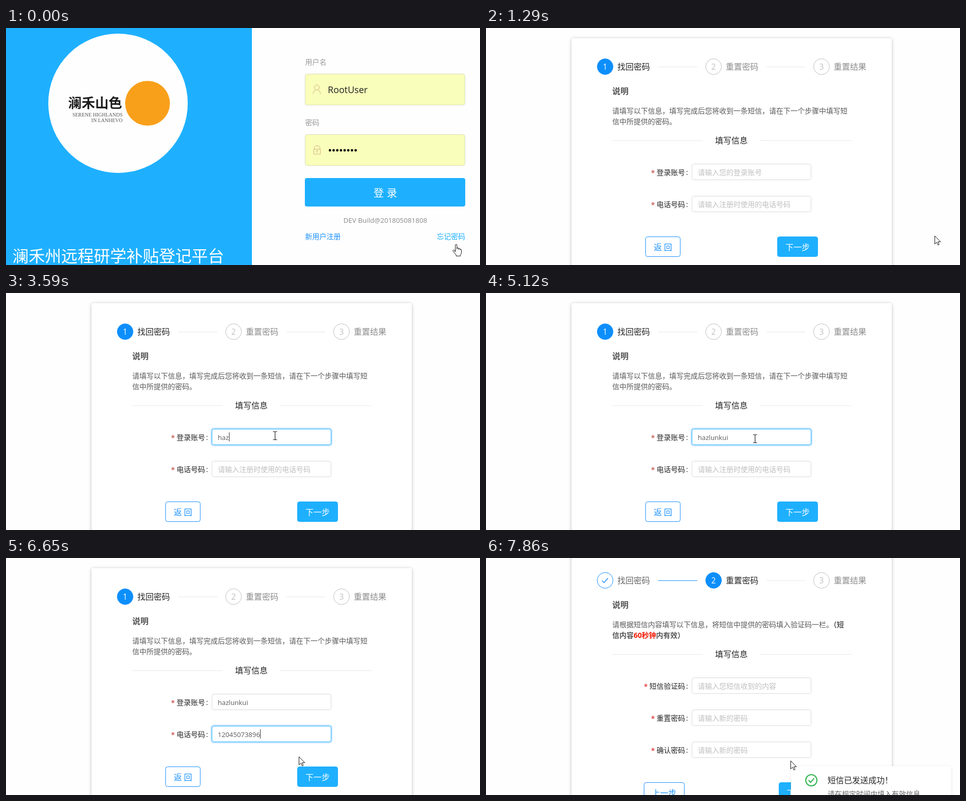
Animation of 931 by 466 pixels, one loop 7.99 s. Source, as an HTML page:

```html
<!DOCTYPE html>
<html lang="zh-CN">
<head>
<meta charset="utf-8">
<title>找回密码</title>
<style>
  html, body { margin: 0; width: 100%; height: 100%; overflow: hidden; background: #fefefe; }
  svg { display: block; width: 100vw; height: 100vh; }
  text { font-family: 'Open Sans', 'Noto Sans CJK SC', 'Noto Sans CJK', sans-serif; }
  .serif { font-family: 'Liberation Serif', 'Noto Serif', serif; }
</style>
</head>
<body>
<svg id="stage" viewBox="0 0 931 466"></svg>
<script>
const LOOP = 7990;
const SKY = '#1eb0ff', BLUE = '#1890ff', GREY = '#d9d9d9';
const LOGIN = 'hazlunkui', PHONE = '12045073896';

// ---- drawing helpers (text is placed by its vertical centre) ----
const text = (x, cy, str, size, fill, more = '') =>
  `<text x="${x}" y="${cy + size * 0.38}" font-size="${size}" fill="${fill}" ${more}>${str}</text>`;
const rect = (x, y, w, h, fill, more = '') =>
  `<rect x="${x}" y="${y}" width="${w}" height="${h}" fill="${fill}" ${more}/>`;
const line = (x1, x2, y, color, more = '') =>
  `<path d="M${x1} ${y}H${x2}" stroke="${color}" ${more}/>`;
const mid = 'text-anchor="middle"';

const field = (id, cy, label, hint, star) => {
  const left = 391 - label.length * 14;
  return text(left - 11, cy + 1, '*', 14, star) +
    text(left, cy, label + '<tspan dx="2">:</tspan>', 14, '#262626') +
    rect(403, cy - 18, 237, 34, 'none', `id="${id}Glow" display="none" rx="5" stroke="${BLUE}" stroke-opacity=".22" stroke-width="3"`) +
    rect(404.5, cy - 16.5, 234, 31, '#fff', `id="${id}Box" rx="4" stroke="${GREY}"`) +
    text(416, cy, hint, 14, '#bfbfbf', `id="${id}Hint"`) +
    text(416, cy, '', 13.2, '#595959', `id="${id}Text"`) +
    `<path id="${id}Caret" stroke="#333"/>`;
};

const heading = () =>
  text(248, 124, '说明', 16, '#555', 'font-weight="700"') +
  line(248, 426, 221.5, '#e8e8e8') + line(537, 718, 221.5, '#e8e8e8') +
  text(450, 221, '填写信息', 16, '#262626');

const stepMark = (n, cx, title) =>
  `<circle id="ring${n}" cx="${cx}" cy="76" r="15.5"/>` +
  text(cx, 76, n, 15.5, '#bfbfbf', `id="num${n}" ${mid}`) +
  text(cx + 24, 76, title, 16, '#8c8c8c', `id="title${n}"`);

const button = (id, x, y, w, label, solid) =>
  rect(x + .5, y + .5, w - 1, 39, solid ? SKY : '#fff', `id="${id}" rx="4" stroke="${solid ? SKY : BLUE}"`) +
  text(x + w / 2, y + 20.5, label, 16, solid ? '#fff' : BLUE, mid);

// ---- scenes ----
function loginPage() {
  const box = y => rect(587.5, y + .5, 314, 61, '#f9ffba', 'rx="4" stroke="#d9dbc0"');
  let dots = '';
  for (let i = 0; i < 8; i++) dots += `<circle cx="${636.3 + i * 7.2}" cy="240.5" r="2.4"/>`;
  return rect(0, 0, 483, 466, SKY) +
    '<circle cx="220" cy="148" r="137" fill="#fefefe"/>' +
    '<circle cx="278" cy="148" r="44" fill="#f9a01b"/>' +
    text(122, 147, '澜禾山色', 26.5, '#1c1c1c', 'font-weight="700"') +
    text(229, 170, 'SERENE HIGHLANDS', 10, '#555', 'class="serif" text-anchor="end"') +
    text(229, 181, 'IN LANHEVO', 10, '#555', 'class="serif" text-anchor="end"') +
    text(12.5, 448, '澜禾州远程研学补贴登记平台', 32, '#fff') +
    text(587.5, 67, '用户名', 14, '#999') + box(90) +
    text(587.5, 186, '密码', 14, '#999') + box(209) +
    `<g fill="none" stroke="#d2b183">
      <circle cx="610.500" cy="117" r="5"/><path d="M603.500 130q0-6 4.500-8m5 0q4.500 2 4.500 8"/>
      <path d="M604.500 238.500h13v9.500h-13zM605.500 238v-2.500a5.500 4 0 0 1 11 0v2.500M609 241.500h4m-2 0v4"/></g>` +
    text(632, 121, 'RootUser', 18, '#222') + dots +
    rect(587, 295, 315, 56, SKY, 'rx="4"') +
    text(745, 324, '登 录', 20.5, '#fff', mid) +
    text(745, 378, 'DEV Build@201805081808', 13.4, '#888', mid) +
    text(587.5, 410, '新用户注册', 14, BLUE) +
    text(846, 410, '忘记密码', 14, BLUE, 'id="forgot"');
}

function resetPage() {
  const red1 = '#b8392f', red2 = '#e01212', body = '#595959';
  return rect(168, 20, 629, 700, '#fff', 'rx="4" filter="url(#cardShadow)"') +
    stepMark(1, 234, '找回密码') + stepMark(2, 447, '重置密码') + stepMark(3, 659, '重置结果') +
    `<path id="tick" d="M228 76.500l4 4 7.500-9" fill="none" stroke="${BLUE}" stroke-width="1.500"/>` +
    line(338, 415, 76.5, '#e8e8e8', 'id="link1"') + line(551, 627, 76.5, '#e8e8e8') +
    '<g clip-path="url(#view)"><g id="pane1">' + heading() +
    text(248, 163, '请填写以下信息，填写完成后您将收到一条短信，请在下一个步骤中填写短', 14, body) +
    text(248, 184, '信中所提供的密码。', 14, body) +
    field('login', 284, '登录账号', '请输入您的登录账号', red1) +
    field('phone', 347, '电话号码', '请输入注册时使用的电话号码', red1) +
    '</g><g id="pane2">' + heading() +
    text(248, 163, '请根据短信内容填写以下信息，将短信中提供的密码填入验证码一栏。<tspan font-weight="700">（短</tspan>', 14, body) +
    text(248, 184, '信内容<tspan fill="#f01800">60秒钟</tspan>内有效）', 14, body, 'font-weight="700"') +
    field('code', 284, '短信验证码', '请输入您短信收到的内容', red2) +
    field('pass', 347, '重置密码', '请输入新的密码', red2) +
    field('again', 410, '确认密码', '请输入新的密码', red2) +
    '</g></g><g id="keys1">' + button('back', 313, 410, 69, '返 回') + button('next', 572, 410, 80, '下一步', true) +
    '</g><g id="keys2">' + button('prev', 310, 473, 80, '上一步') + button('next2', 575, 473, 80, '下一步', true) + '</g>';
}

const notice = () =>
  rect(599, 409, 315, 90, '#fff', 'rx="4" filter="url(#noteShadow)"') +
  '<circle cx="639" cy="437" r="11" fill="none" stroke="#2cb34a" stroke-width="2"/>' +
  '<path d="M633.500 437l4 4.200 7-8" fill="none" stroke="#2cb34a" stroke-width="2"/>' +
  text(671, 437, '短信已发送成功！', 16, '#262626') +
  text(671, 464, '请在规定时间内填入有效信息', 14, '#666');

const pointers = {
  arrow: '<path d="M.5.8V16.800L4.300 13.300 6.700 18.800 9 17.800 6.600 12.400H11.800Z" fill="#fff" stroke="#111"/>',
  hand: '<path d="M5.500 15V2.200a1.600 1.600 0 0 1 3.200 0V9.500 8.600a1.500 1.500 0 0 1 3 0V10.500 9.600a1.500 1.500 0 0 1 3 0V11.400a1.400 1.400 0 0 1 2.800 0V16q0 3-2 5.500V23.300H7.200V21.500Q4.500 18 1 13.600a1.500 1.500 0 0 1 2.300-1.800Z" fill="#fff" stroke="#111"/>',
  beam: '<path d="M-3.500 .5H-1Q.5.5.5 2 .5.5 2 .5H4.500M.5 2V15M-3.500 16.500H-1Q.5 16.500.5 15 .5 16.500 2 16.500H4.500" fill="none" stroke="#222" stroke-width="1.200"/>'
};

document.getElementById('stage').innerHTML = `<defs>
  <filter id="cardShadow" x="-5%" y="-5%" width="110%" height="110%"><feDropShadow dx="0" dy="1" stdDeviation="3" flood-opacity=".26"/></filter>
  <filter id="noteShadow" x="-5%" y="-15%" width="110%" height="130%"><feDropShadow dx="0" dy="1" stdDeviation="2.500" flood-opacity=".1"/></filter>
  <clipPath id="view"><rect x="248" y="90" width="470" height="420"/></clipPath></defs>
  ${rect(0, 0, 931, 466, '#fefefe')}
  <g id="signIn">${loginPage()}</g><g id="reset">${resetPage()}</g><g id="note">${notice()}</g>
  ${Object.keys(pointers).map(k => `<g id="${k}">${pointers[k]}</g>`).join('')}`;

// ---- timing ----
const els = {};
document.querySelectorAll('[id]').forEach(e => els[e.id] = e);
const set = (id, attrs) => { for (const k in attrs) els[id].setAttribute(k, attrs[k]); };
const show = (id, on) => set(id, { display: on ? 'inline' : 'none' });
const clamp = v => Math.max(0, Math.min(1, v));
const cubic = u => u < .5 ? 4 * u ** 3 : 1 - 4 * (1 - u) ** 3;
const smooth = u => u * u * (3 - 2 * u);

// progress in n visible jumps, the first at a and the last at b
function stepped(t, a, b, n) {
  if (t < a) return 0;
  if (n < 2 || t >= b) return 1;
  return (Math.floor((t - a) / ((b - a) / (n - 1))) + 1) / n;
}
function mix(a, b, u) {
  const part = (c, i) => parseInt(c.slice(i, i + 2), 16);
  return `rgb(${[1, 3, 5].map(i => Math.round(part(a, i) + (part(b, i) - part(a, i)) * u))})`;
}

// start, end, jumps, pointer, x, y
const moves = [
  [0, 0, 1, 'hand', 877, 425],
  [100, 430, 4, 'hand', 889, 385],
  [540, 760, 3, 'hand', 885, 415],
  [980, 980, 1, 'hand', 875, 408],
  [1290, 1290, 1, 'arrow', 881, 408],
  [1740, 2283, 6, 'arrow', 560, 306],
  [2391, 2500, 2, 'beam', 528, 272],
  [5120, 5560, 5, 'beam', 527, 334],
  [5880, 5880, 1, 'beam', 526, 332],
  [6434, 6648, 3, 'arrow', 575, 390],
  [6755, 6862, 2, 'hand', 603, 419],
  [7090, 7090, 1, 'arrow', 609, 419],
  [7860, 7860, 1, 'arrow', 598, 398]
];
function pointer(t) {
  let kind, x = 0, y = 0;
  for (const [a, b, n, k, tx, ty] of moves) {
    if (t < a) break;
    const u = smooth(stepped(t, a, b, n));
    kind = k; x += (tx - x) * u; y += (ty - y) * u;
  }
  for (const k in pointers) show(k, k === kind);
  set(kind, { transform: `translate(${Math.round(x)} ${Math.round(y)})` });
}

// time and number of letters typed so far
const typing = [[2600, 0], [2940, 1], [3160, 2], [3590, 3], [3700, 4], [3810, 6], [4040, 8], [4140, 9]];

function entry(id, cy, value, hover, focus, idle) {
  els[id + 'Text'].textContent = value;
  show(id + 'Hint', !value);
  show(id + 'Glow', focus);
  set(id + 'Box', { stroke: hover || focus ? SKY : GREY });
  const on = focus && Math.floor(idle / 550) % 2 === 0;
  show(id + 'Caret', on);
  if (on) {
    const x = Math.round(416 + (value ? els[id + 'Text'].getComputedTextLength() : 0)) + .5;
    set(id + 'Caret', { d: `M${x} ${cy - 10}v18` });
  }
}

function render(t) {
  const onForm = t >= 1290, second = t >= 7090;
  show('signIn', !onForm);
  show('reset', onForm);
  set('forgot', { fill: t < 1210 ? SKY : BLUE });

  const last = typing.filter(k => k[0] <= t).pop() || [0, 0];
  entry('login', 284, LOGIN.slice(0, last[1]), t >= 2391 && t < 5230, t >= 2600 && t < 5450, t - last[0]);
  const digits = Math.round(stepped(t, 6220, 6648, 5) * PHONE.length);
  const key = t < 6220 ? 5450 : Math.min(t, 6648);
  entry('phone', 347, PHONE.slice(0, digits), t >= 5340 && t < 6541, t >= 5450 && !second, t - key);

  // the switch to the second pane advances in 110 ms ticks
  const tick = second ? 7090 + Math.floor((t - 7090) / 110) * 110 : 0;
  const u = clamp((tick - 7125) / 300), fade = clamp((tick - 7125) / 350);
  const shift = 470 * cubic(u), tint = 1 - (1 - u) ** 1.5;
  set('reset', { transform: `translate(0 ${second ? -32 : 0})` });
  set('pane1', { transform: `translate(${-shift} 0)`, opacity: 1 - fade });
  set('pane2', { transform: `translate(${470 - shift} 0)`, opacity: fade });
  show('pane2', second);
  show('keys1', !second);
  show('keys2', second);
  set('next', { fill: t >= 6755 ? '#45bdff' : SKY });

  set('ring1', { fill: mix('#0c8ffb', '#ffffff', tint), stroke: BLUE });
  set('ring2', { fill: mix('#ffffff', '#0c8ffb', tint), stroke: second ? mix('#bfbfbf', '#0c8ffb', Math.sqrt(tint)) : '#bfbfbf' });
  set('ring3', { fill: '#fff', stroke: '#bfbfbf' });
  set('num1', { fill: '#fff' });
  set('num2', { fill: u > 0 ? '#fff' : '#bfbfbf' });
  set('title1', { fill: second ? '#666' : '#262626' });
  set('title2', { fill: second ? '#262626' : '#8c8c8c' });
  set('link1', { stroke: second ? BLUE : '#e8e8e8' });
  show('num1', !second);
  show('tick', second);

  set('note', { opacity: clamp((tick - 7400) / 240) });
  pointer(t);
}

const start = performance.now();
function loop() {
  render((performance.now() - start) % LOOP);
  requestAnimationFrame(loop);
}
loop();
</script>
</body>
</html>
```
